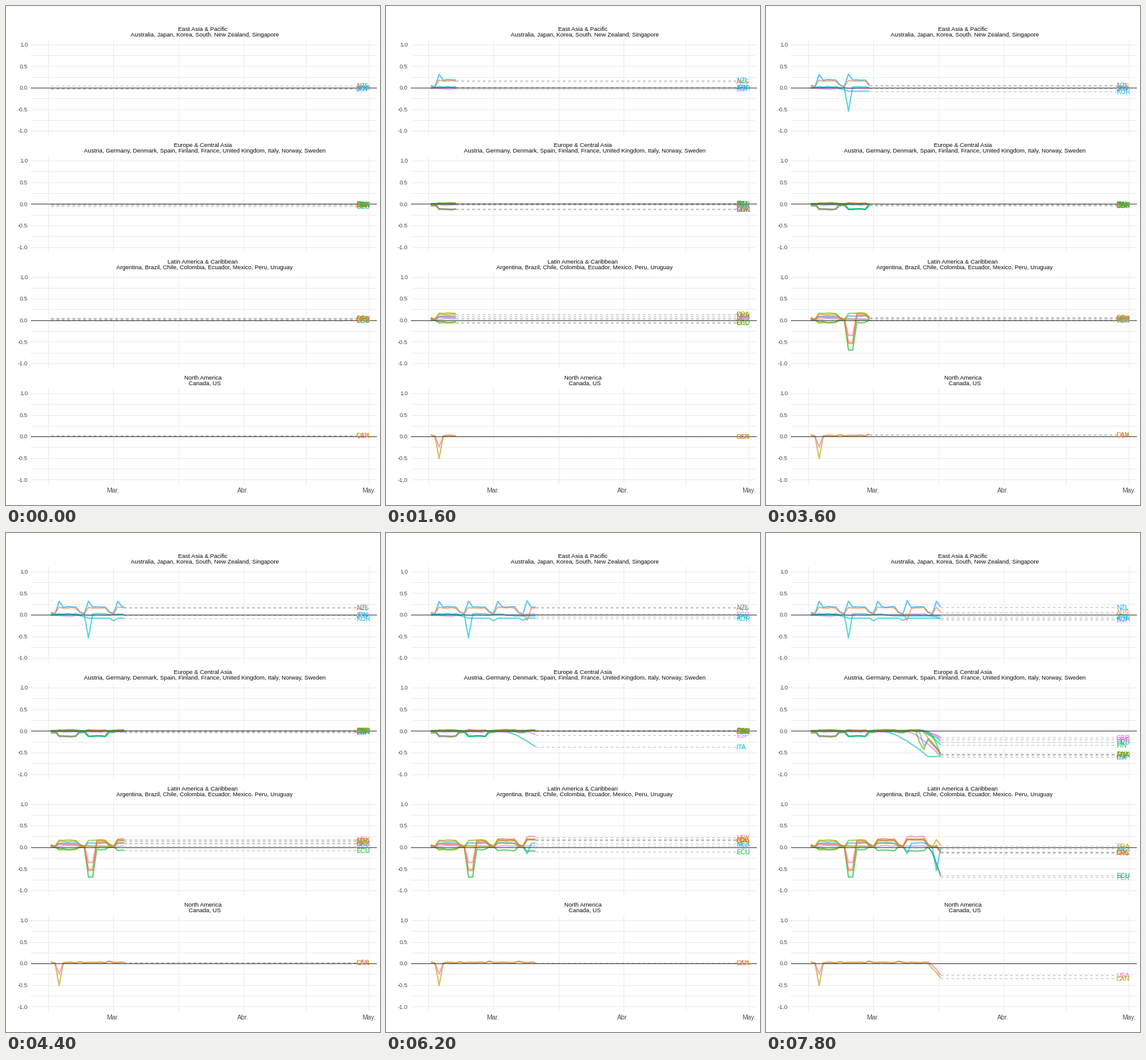
These frames come from a looping animation (600x800 px, 8000 ms). A matplotlib script:

```python
import math

import matplotlib.pyplot as plt
import numpy as np
from matplotlib.animation import FuncAnimation

W, H, DPI = 600, 800, 100
PT = 72 / DPI
FRAMES, STEP = 40, 200
LAST_DAY = 31
DAY0, DAY_W = 71.8, 6.722
LABEL_X = 562
LEFT, RIGHT = 40, 594
UNIT, ZERO, PANEL_GAP = 69.2, 130.4, 186.4
HALF_PIXEL = 0.5

plt.rcParams["font.family"] = "Liberation Sans"
rng = np.random.default_rng(7)
DAYS = np.arange(LAST_DAY + 1)
WEEK, WEEKDAY = DAYS // 7, DAYS % 7  # the first day is a Saturday
# Each day lands on a whole frame; frames between two days are interpolated.
DAY_FRAMES = np.round(DAYS * 1.2555)


def hue_color(hue, chroma=100, light=65):
    """Polar LUV colour converted to sRGB."""
    u = chroma * math.cos(math.radians(hue)) / (13 * light) + 0.1978
    v = chroma * math.sin(math.radians(hue)) / (13 * light) + 0.4683
    y = ((light + 16) / 116) ** 3
    x = 9 * y * u / (4 * v)
    z = 3 * y / v - x / 3 - 5 * y
    rgb = np.array([3.2406 * x - 1.5372 * y - 0.4986 * z,
                    -0.9689 * x + 1.8758 * y + 0.0415 * z,
                    0.0557 * x - 0.2040 * y + 1.0570 * z])
    rgb = np.clip(rgb, 0, 1)
    return tuple(np.where(rgb <= 0.0031308, 12.92 * rgb,
                          1.055 * rgb ** (1 / 2.4) - 0.055))


def series(rest, work, trend=0, monday=None, lull=None, holiday=None,
           drop=LAST_DAY, depth=0, end=LAST_DAY):
    """Weekly rhythm, then an eased slide from day `drop` to `depth`."""
    y = np.where(WEEKDAY > 1, work + trend * np.minimum(WEEK, 3), rest)
    y = np.where((WEEKDAY == 1) & (rest > 0), rest * 0.2, y)
    if monday is not None:
        y[WEEKDAY == 2] = monday
    if lull is not None:
        y[(WEEK == lull) & (WEEKDAY > 1)] = -0.13
    y = y + rng.uniform(-0.012, 0.012, y.size)
    if drop < end:
        k = np.clip((DAYS - drop) / (end - drop), 0, 1) ** 1.5
        y = y * (1 - k) + depth * k
    for day, value in (holiday or {}).items():
        y[day] = value
    return y


def europe(drop, depth, lull=None, **kw):
    rest, work = rng.uniform(-0.05, 0), rng.uniform(-0.04, 0.02)
    return series(rest, work, lull=lull, drop=drop, depth=depth, **kw)


def carnival(level):
    return {9: level, 10: level}


ASIA = {
    "AUS": series(0.04, 0.15, monday=0.16, holiday={23: -0.14, 31: 0.05}),
    "JPN": series(0, 0.01, holiday={9: -0.55}, drop=15, depth=-0.04, end=20),
    "KOR": series(0, 0.01, holiday={15: -0.15, 22: -0.14},
                  drop=5, depth=-0.09, end=9),
    "NZL": series(0.05, 0.17, monday=0.31),
    "SGP": series(-0.02, -0.04, trend=0.015, drop=28, depth=-0.11),
}

EUROPE = {
    "AUT": europe(26, -0.55),
    "DEU": europe(27, -0.25, lull=1),
    "DNK": europe(25, -0.53, lull=0, holiday={26: -0.28, 27: -0.44}),
    "ESP": europe(23, -0.6),
    "FIN": europe(26, -0.33, lull=1),
    "FRA": europe(28, -0.55),
    "GBR": europe(27, -0.16, lull=0),
    "ITA": europe(17, -0.6, lull=1, end=28),
    "NOR": europe(25, -0.56, lull=0, holiday={27: -0.36}),
    "SWE": europe(27, -0.2, lull=0),
}

LATIN = {
    "ARG": series(0.03, 0.06, trend=0.04, holiday=carnival(-0.52),
                  drop=28, depth=-0.14),
    "BRA": series(0.04, 0.13, trend=0.013, holiday=carnival(-0.55),
                  drop=30, depth=0.03),
    "CHL": series(0.01, -0.07, trend=0.077, drop=28, depth=-0.12),
    "COL": series(0.06, 0.15, trend=0.007, drop=28, depth=-0.11),
    "ECU": series(0, -0.05, trend=-0.015, holiday=carnival(-0.7),
                  drop=28, depth=-0.65),
    "MEX": series(0.04, 0.09, holiday={23: -0.16, 30: -0.55},
                  drop=30, depth=-0.03),
    "PER": series(0, 0.02, drop=28, depth=-0.7),
    "URY": series(0.05, 0.06, trend=0.06, holiday=carnival(-0.36),
                  drop=28, depth=-0.12),
}

NORTH = {
    "CAN": series(0.04, 0.01, holiday={2: -0.52}, drop=27, depth=-0.35),
    "USA": series(0.03, 0.015, holiday={2: -0.25}, drop=28, depth=-0.28),
}

PANELS = [
    ("East Asia & Pacific",
     "Australia, Japan, Korea, South, New Zealand, Singapore", ASIA),
    ("Europe & Central Asia",
     "Austria, Germany, Denmark, Spain, Finland, France, United Kingdom, "
     "Italy, Norway, Sweden", EUROPE),
    ("Latin America & Caribbean",
     "Argentina, Brazil, Chile, Colombia, Ecuador, Mexico, Peru, Uruguay", LATIN),
    ("North America", "Canada, US", NORTH),
]

# Colours follow the alphabetical order of the country names.
ORDER = ("ARG AUS AUT BRA CAN CHL COL DNK ECU FIN FRA DEU ITA JPN KOR MEX "
         "NZL NOR PER SGP ESP SWE GBR USA URY").split()
COLORS = {c: hue_color(15 + 360 * i / len(ORDER)) for i, c in enumerate(ORDER)}

fig = plt.figure(figsize=(W / DPI, H / DPI), dpi=DPI, facecolor="white")
ax = fig.add_axes((0, 0, 1, 1))
ax.set(xlim=(0, W), ylim=(H, 0))
ax.axis("off")


def line(xs, ys, color, width=1.07, **kw):
    return ax.plot(xs, ys, color=color, lw=width * PT, **kw)[0]


def level(y, color, zorder):
    """Full-width rule, nudged so that it snaps to the pixel row holding y."""
    line((LEFT, RIGHT), (y + HALF_PIXEL,) * 2, color, zorder=zorder)


def label(x, y, text, size, color, **kw):
    return ax.text(x, y, text, fontsize=size * PT, color=color, va="baseline", **kw)


def draw_panel(zero, title, countries):
    top, bottom = zero - 1.1 * UNIT, zero + 1.1 * UNIT
    mid = (LEFT + RIGHT) / 2
    label(mid - 1.4, top - 14.3, title, 9.5, "#0d0d0d", ha="center")
    label(mid + 1.6, top - 5.3, countries, 9.5, "#0d0d0d", ha="center")
    for q in range(-4, 5):
        y = zero - q / 4 * UNIT
        level(y, "#ebebeb", 1)
        if q % 2 == 0:
            label(35, y + 3.8, f"{q / 4:.1f}", 9.5, "#4d4d4d", ha="right")
    for x in (68, 172, 277, 381, 481, 582):
        line((x, x), (top, bottom), "#ebebeb", zorder=1)
    level(zero, "#404040", 4)


tracks = []
for i, (title, countries, data) in enumerate(PANELS):
    zero = ZERO + i * PANEL_GAP
    draw_panel(zero, title, countries)
    # Names early in the alphabet end up on top.
    for code in sorted(data, key=ORDER.index, reverse=True):
        color = COLORS[code]
        dash = line([], [], "#bebebe", ls=(0, (4, 4)), zorder=2)
        path = line([], [], color, 2.13, alpha=0.62, zorder=3,
                    solid_capstyle="butt", solid_joinstyle="round")
        tag = label(LABEL_X, 0, code, 10.2, color, ha="left", zorder=5)
        tracks.append((zero - data[code] * UNIT, dash, path, tag))

for x, month in ((171.5, "Mar."), (380.5, "Abr."), (581.7, "May.")):
    label(x, 779.5, month, 10.4, "#4d4d4d", ha="center")


def update(frame):
    now = np.interp(frame, DAY_FRAMES, DAYS)
    past = DAYS[DAYS < now]
    x = DAY0 + now * DAY_W
    for ys, dash, path, tag in tracks:
        y = np.interp(now, DAYS, ys)
        dash.set_data((x, LABEL_X), (y + HALF_PIXEL,) * 2)
        path.set_data(DAY0 + np.append(past, now) * DAY_W,
                      np.append(ys[past], y))
        tag.set_y(y + 4.5)
    return []


anim = FuncAnimation(fig, update, frames=FRAMES, interval=STEP,
                     repeat=True, repeat_delay=0, blit=False)
plt.show()
```
